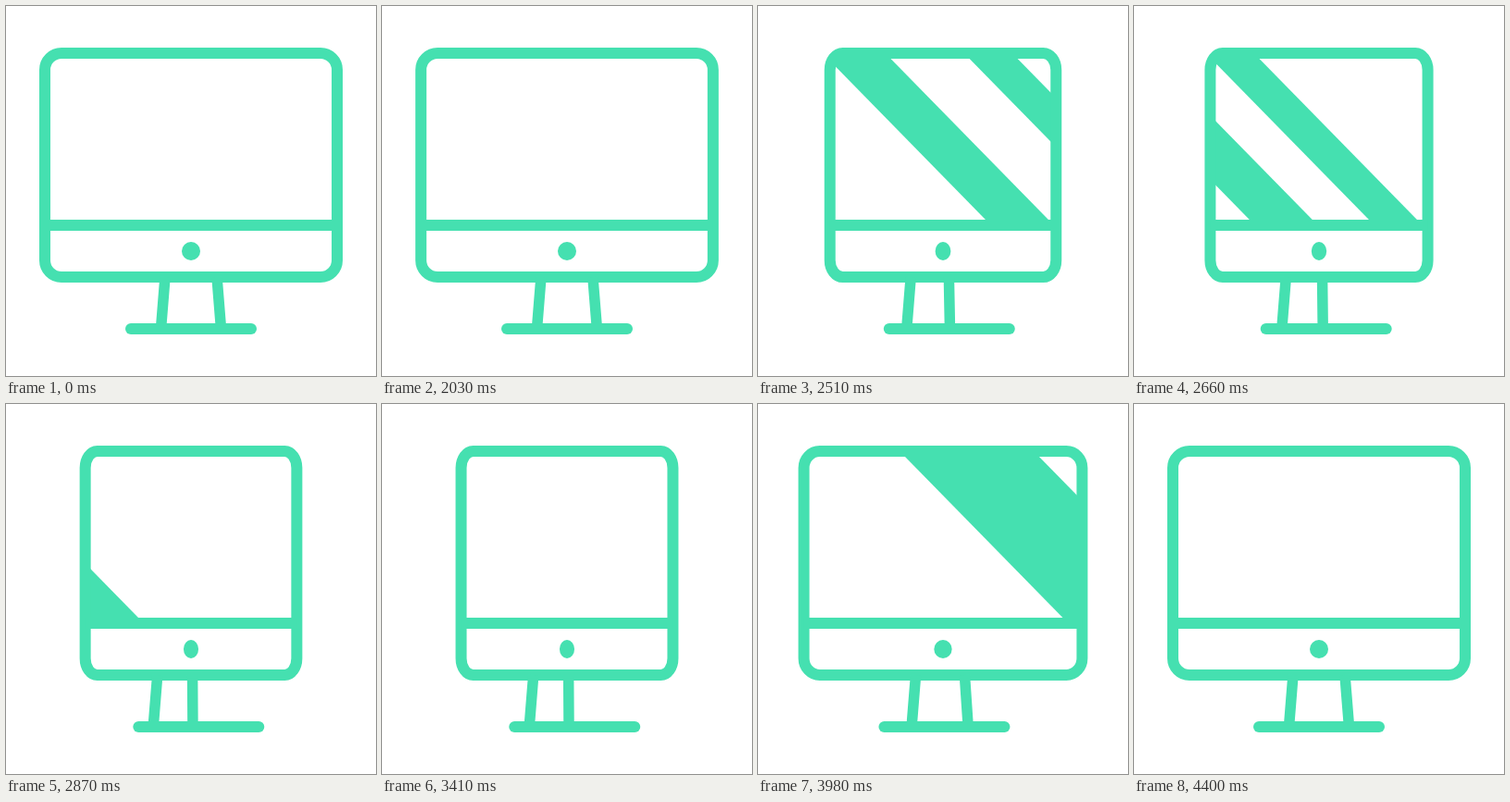
These frames come from a looping animation (400 px wide and 400 px high, 4.43 s). An HTML page:

```html
<!DOCTYPE html>
<html lang="en">
<head>
<meta charset="utf-8">
<title>Turning monitor</title>
<style>
  html, body { margin: 0; width: 100%; height: 100%; overflow: hidden; background: #fff; }
  svg { display: block; width: 100vw; height: 100vh; }
</style>
</head>
<body>
<svg viewBox="0 0 400 400" fill="none" stroke="#45e0b0" stroke-width="12">
  <clipPath id="screen"><rect class="case" y="51" height="242" ry="18"/></clipPath>
  <g clip-path="url(#screen)" fill="#45e0b0" stroke="none">
    <path class="glare"/><path class="glare"/><path class="glare"/>
  </g>
  <rect class="case" y="51" height="242" ry="18"/>
  <path id="bar"/>
  <path id="legs" stroke-width="11.5"/>
  <path id="base" stroke-linecap="round"/>
  <ellipse id="dot" cx="200" cy="265" ry="10" fill="#45e0b0" stroke="none"/>
</svg>
<script>
const LOOP = 4430, TURN = 2030, BACK = 3200, END = 4400, SQUEEZE = 44.5;
const $ = id => document.getElementById(id);
const cases = document.querySelectorAll('.case');
const glares = document.querySelectorAll('.glare');

const progress = (t, from, to) => Math.min(1, Math.max(0, (t - from) / (to - from)));
const outQuad = u => 1 - (1 - u) ** 2;
const outCubic = u => 1 - (1 - u) ** 3;
const inOutCubic = u => u < 0.5 ? 4 * u ** 3 : 1 - 4 * (1 - u) ** 3;
const inOutSine = u => (1 - Math.cos(Math.PI * u)) / 2;

// Diagonal band whose centre crosses mid-screen at x.
function band(x, width) {
  const l = x - width / 2, r = x + width / 2, lean = 97;
  return `M${l - lean} 45H${r - lean}L${r + lean} 243H${l + lean}Z`;
}

function draw(t) {
  const d = SQUEEZE * (t < BACK
    ? outCubic(progress(t, TURN, 3180))
    : 1 - inOutCubic(progress(t, BACK, END)));
  const scale = 1 - d / 158, shift = 0.19 * d;

  for (const c of cases) {
    c.setAttribute('x', 42 + d);
    c.setAttribute('width', 316 - 2 * d);
    c.setAttribute('rx', 18 * scale);
  }
  $('bar').setAttribute('d', `M${42 + d} 237H${358 - d}`);
  $('dot').setAttribute('rx', 10 - 0.045 * d);
  $('legs').setAttribute('d',
    `M${172 - shift} 293L${167.5 - shift} 349M${228 - 0.605 * d} 293L${232.5 - 0.7 * d} 349`);
  $('base').setAttribute('d', `M${135 + shift} 349H${265 + shift}`);

  const sweepLeft = delay => 745 - 920 * outQuad(progress(t - delay, TURN, 3344));
  const sweepRight = -260 + 792 * inOutSine(progress(t, BACK, END));
  glares[0].setAttribute('d', t < BACK ? band(sweepLeft(0), 68) : '');
  glares[1].setAttribute('d', t < BACK ? band(sweepLeft(150), 52) : '');
  glares[2].setAttribute('d', t < BACK ? '' : band(sweepRight, 145));
}

const start = performance.now();
function tick() {
  draw((performance.now() - start) % LOOP);
  requestAnimationFrame(tick);
}
tick();
</script>
</body>
</html>
```
